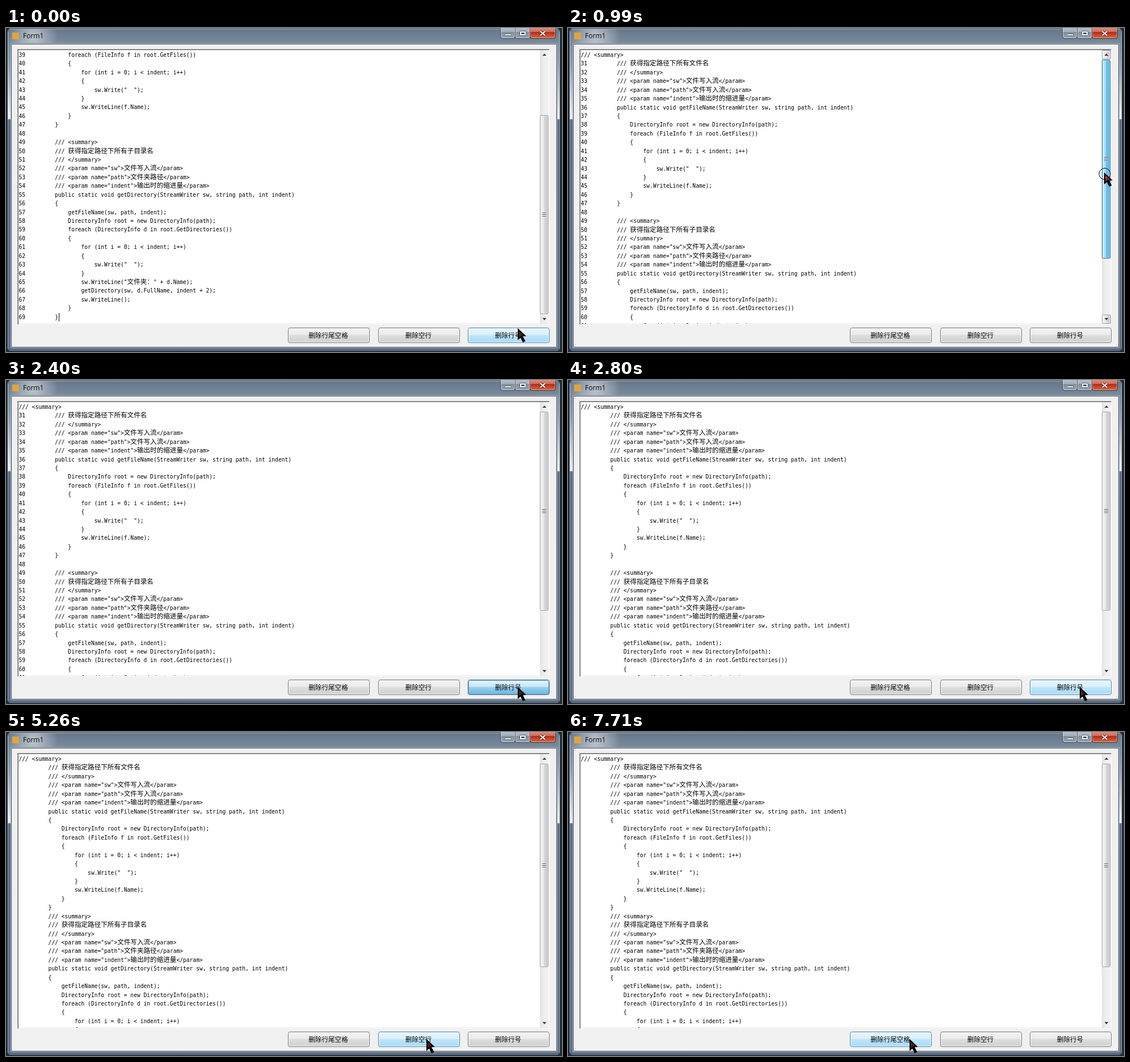
An HTML page with a canvas that plays this animation: 980x572 px, repeating every 8000 ms.

```html
<!DOCTYPE html>
<html lang="zh">
<head>
<meta charset="utf-8">
<title>Form1</title>
<style>
html, body { margin: 0; width: 100%; height: 100%; overflow: hidden; background: #5b6e84; }
canvas { display: block; }
</style>
</head>
<body>
<canvas id="stage" width="980" height="572"></canvas>
<script>
const ctx = document.getElementById('stage').getContext('2d');
const LOOP = 8000, COL = 5.79, ROW = 15.43;
const LATIN = '9.63px "DejaVu Sans Mono", monospace';
const HAN = '11.58px "Noto Sans CJK SC", "Noto Sans CJK", sans-serif';

const code = `/// <summary>
/// 获得指定路径下所有文件名
/// </summary>
/// <param name="sw">文件写入流</param>
/// <param name="path">文件写入流</param>
/// <param name="indent">输出时的缩进量</param>
public static void getFileName(StreamWriter sw, string path, int indent)
{
    DirectoryInfo root = new DirectoryInfo(path);
    foreach (FileInfo f in root.GetFiles())
    {
        for (int i = 0; i < indent; i++)
        {
            sw.Write("  ");
        }
        sw.WriteLine(f.Name);
    }
}

/// <summary>
/// 获得指定路径下所有子目录名
/// </summary>
/// <param name="sw">文件写入流</param>
/// <param name="path">文件夹路径</param>
/// <param name="indent">输出时的缩进量</param>
public static void getDirectory(StreamWriter sw, string path, int indent)
{
    getFileName(sw, path, indent);
    DirectoryInfo root = new DirectoryInfo(path);
    foreach (DirectoryInfo d in root.GetDirectories())
    {
        for (int i = 0; i < indent; i++)
        {
            sw.Write("  ");
        }
        sw.WriteLine("文件夹：" + d.Name);
        getDirectory(sw, d.FullName, indent + 2);
        sw.WriteLine();
    }
}`.split('\n');

const pad = ' '.repeat(9);
const numbered = code.map((s, i) => i ? 30 + i + pad + s : s);
const plain = code.map((s, i) => i ? pad + s : s);
const compact = plain.filter(s => s.trim());

// time, x, y of the pointer
const path = [
  [0, 902, 530], [120, 930, 470], [240, 944, 390], [390, 950, 387], [540, 950, 385],
  [690, 949, 337], [840, 945, 298], [990, 945, 255], [1150, 944, 263], [1300, 921, 330],
  [1450, 890, 430], [1570, 896, 513], [1720, 900, 528], [1850, 904, 541], [2000, 902, 542],
  [3080, 902, 540], [3230, 897, 531], [3380, 850, 536], [3500, 790, 541], [3620, 750, 543],
  [3740, 741, 542], [6060, 700, 541], [6180, 640, 543], [6300, 606, 543], [6450, 605, 543],
  [6570, 604, 543], [6850, 603, 543], [7710, 602, 542]
];
const buttons = [
  { x: 497, label: '删除行尾空格', down: 7160, up: 7560 },
  { x: 656, label: '删除空行', down: 4860, up: 5260 },
  { x: 814, label: '删除行号', down: 2400, up: 2800 }
];
const skins = {
  normal: ['#f2f2f2', '#ebebeb', '#dddddd', '#cfcfcf'],
  hover: ['#eaf6fd', '#d9f0fc', '#bee6fd', '#a7d9f5'],
  press: ['#e5f4fc', '#c4e5f6', '#98d1ef', '#68b3db'],
  thumb: ['#f4f4f4', '#e9e9eb', '#d9dadc', '#c0c0c4'],
  drag: ['#c6ebfc', '#a3dcf8', '#6cc4ee', '#58b2e0'],
  pane: ['#bcc5cf', '#a3afbc', '#7f8d9d', '#9aa8b6'],
  close: ['#dfa091', '#cb6a55', '#b02c17', '#d2744e']
};

const at = (list, t) => list.findLast(k => t >= k[0]);

function rect(x, y, w, h, color) {
  ctx.fillStyle = color;
  ctx.fillRect(x, y, w, h);
}

function fade(x0, y0, x1, y1, colors, stops) {
  const g = ctx.createLinearGradient(x0, y0, x1, y1);
  colors.forEach((c, i) => g.addColorStop(stops ? stops[i] : i / (colors.length - 1), c));
  return g;
}

function round(x, y, w, h, r, fill, line) {
  ctx.beginPath();
  ctx.roundRect(x + .5, y + .5, w - 1, h - 1, r);
  if (fill) { ctx.fillStyle = fill; ctx.fill(); }
  if (line) { ctx.strokeStyle = line; ctx.lineWidth = 1; ctx.stroke(); }
}

// A raised part: two-tone gradient, outer line and inner line
function raised(x, y, w, h, r, skin, line, inner, sideways) {
  const end = sideways ? [x + w, y] : [x, y + h];
  round(x, y, w, h, r, fade(x, y, ...end, skins[skin], [0, .49, .5, 1]), line);
  round(x + 1, y + 1, w - 2, h - 2, r, null, inner);
}

function shape(points, color) {
  ctx.beginPath();
  points.forEach(p => ctx.lineTo(...p));
  ctx.closePath();
  ctx.fillStyle = color;
  ctx.fill();
}

function gridText(s, x, y) {
  for (const c of s) {
    const wide = c > '\u2e80';
    ctx.font = wide ? HAN : LATIN;
    if (c !== ' ') ctx.fillText(c, x, y);
    x += wide ? COL * 2 : COL;
  }
}

function drawFrame() {
  rect(0, 0, 980, 572, '#222c37');
  // The glass brightens down to a hard reflection edge
  round(2, 0, 975, 571, 6, fade(0, 0, 0, 572,
    ['#66768a', '#7b8b9e', '#8b9aab', '#eef2f5', '#586b81', '#5b6e84'],
    [0, .05, .11, .28, .283, 1]), '#313d4b');
  rect(6, 1, 967, 1, '#b3bec9');
  const edge = fade(0, 0, 0, 572, ['#b3bec9', '#f4f7f9', '#93a2b2', '#93a2b2'], [0, .28, .283, 1]);
  rect(3, 6, 1, 560, edge);
  rect(975, 6, 1, 560, edge);

  const glow = ctx.createRadialGradient(48, 14, 4, 48, 14, 44);
  glow.addColorStop(0, '#ffffff80');
  glow.addColorStop(1, '#ffffff00');
  rect(4, 2, 100, 26, glow);
  rect(11, 8, 12, 12, '#e0a53c');
  ctx.fillStyle = '#000';
  ctx.textAlign = 'left';
  ctx.font = '12px "Open Sans", sans-serif';
  ctx.fillText('Form1', 30, 18);

  raised(871, -4, 27, 23, 4, 'pane', '#2f3b49', '#ffffff90');
  raised(897, -4, 27, 23, 2, 'pane', '#2f3b49', '#ffffff90');
  raised(923, -4, 46, 23, 4, 'close', '#4a1d18', '#ffffff70');
  round(879, 10, 12, 4, 1, '#fff', '#46525f');
  round(905, 5, 12, 9, 1, '#fff', '#46525f');
  rect(908, 8, 6, 3, '#46525f');
  for (const [w, c] of [[4, '#5c2a25'], [2.2, '#fff']]) {
    ctx.strokeStyle = c;
    ctx.lineWidth = w;
    ctx.beginPath();
    ctx.moveTo(942, 6); ctx.lineTo(950, 13);
    ctx.moveTo(950, 6); ctx.lineTo(942, 13);
    ctx.stroke();
  }

  rect(8, 27, 964, 538, '#b4bfcb');
  rect(9, 28, 962, 536, '#3f4d5d');
  rect(10, 29, 960, 534, '#f0f0f0');
  rect(20, 37, 938, 487, '#a0a0a0');
  rect(21, 38, 937, 486, '#fff');
  rect(21, 38, 936, 485, '#696969');
  rect(22, 39, 935, 484, '#e3e3e3');
  rect(22, 39, 934, 483, '#fff');
}

function drawText(lines, scroll, caret) {
  ctx.save();
  ctx.beginPath();
  ctx.rect(22, 40, 919, 482);
  ctx.clip();
  ctx.fillStyle = '#000';
  ctx.textAlign = 'left';
  lines.forEach((s, i) => gridText(s, 22.5, 51 + i * ROW - scroll));
  if (caret) rect(93, 503, 1, 15, '#000');
  ctx.restore();
}

function drawScrollbar(top, height, active, dragged) {
  rect(941, 39, 16, 483, fade(941, 0, 957, 0, ['#e3e3e3', '#efefef', '#f2f2f2']));
  for (const [y, d] of [[39, 1], [506, -1]]) {
    if (active) raised(941, y, 16, 16, 2, 'thumb', '#979797', '#ffffffb0', true);
    const mid = y + 8;
    shape([[945.5, mid + 2 * d], [952.5, mid + 2 * d], [949, mid - 2 * d]], '#3c3c3c');
  }
  const skin = dragged ? 'drag' : active ? 'hover' : 'thumb';
  const line = dragged ? '#18598a' : active ? '#6c9dbd' : '#979797';
  raised(941, top, 15, height, 2, skin, line, '#ffffff90', true);
  for (let i = -1; i < 2; i++) {
    const y = Math.round(top + height / 2) + i * 3;
    rect(945, y - 1, 7, 1, '#505a64');
    rect(945, y, 7, 1, '#ffffffb0');
  }
}

function drawButton(b, t, x, y) {
  const focused = buttons.filter(o => t >= o.down).sort((p, q) => q.down - p.down)[0] === b;
  const over = x >= b.x && x < b.x + 144 && y >= 529 && y < 557;
  const pressed = t >= b.down && t < b.up;
  const skin = pressed ? 'press' : over ? 'hover' : 'normal';
  const line = pressed ? '#2c628b' : over || focused ? '#3c7fb1' : '#707070';
  const inner = pressed ? '#7ab0cf' : focused && !over ? '#48d0f6' : '#fffffff0';
  raised(b.x, 529, 144, 27, 3, skin, line, inner);
  ctx.fillStyle = '#000';
  gridText(b.label, b.x + 71 - b.label.length * COL, 546.5);
}

function drawPointer(t, x, y, dragged) {
  ctx.save();
  ctx.translate(x, y);
  if (t >= 1300 && t < 1720) {
    rect(-1, -9, 3, 19, '#000');
    rect(-5, -10, 4, 2, '#000');
    rect(2, -10, 4, 2, '#000');
    rect(-5, 9, 4, 2, '#000');
    rect(2, 9, 4, 2, '#000');
  } else {
    shape([[0, 0], [15, 14], [9, 14.5], [13.5, 23], [9, 25], [5, 17], [0, 21]], '#000');
    shape([[2, 5], [10, 12.5], [6, 13], [2, 16]], dragged ? '#b8482a' : '#4c2014');
    if (dragged) {
      ctx.strokeStyle = '#000';
      ctx.lineWidth = 1;
      ctx.beginPath();
      ctx.arc(1, 2.5, 10, 0, Math.PI * 2);
      ctx.stroke();
    }
  }
  ctx.restore();
}

function draw(now) {
  const t = now % LOOP;
  const [, x, y] = at(path, t);
  const [, scroll, top] = at([[0, 139, 154], [690, 81, 115], [840, 28, 76], [990, 0, 56]], t);
  const lines = t < 2800 ? numbered : t < 5260 ? plain : compact;
  drawFrame();
  drawText(lines, scroll, t < 120);
  drawScrollbar(top, t < 5260 ? 351 : 359, t >= 240 && t < 1720, t >= 690 && t < 1300);
  buttons.forEach(b => drawButton(b, t, x, y));
  drawPointer(t, x, y, t >= 690 && t < 1150);
  requestAnimationFrame(draw);
}
requestAnimationFrame(draw);
</script>
</body>
</html>
```
